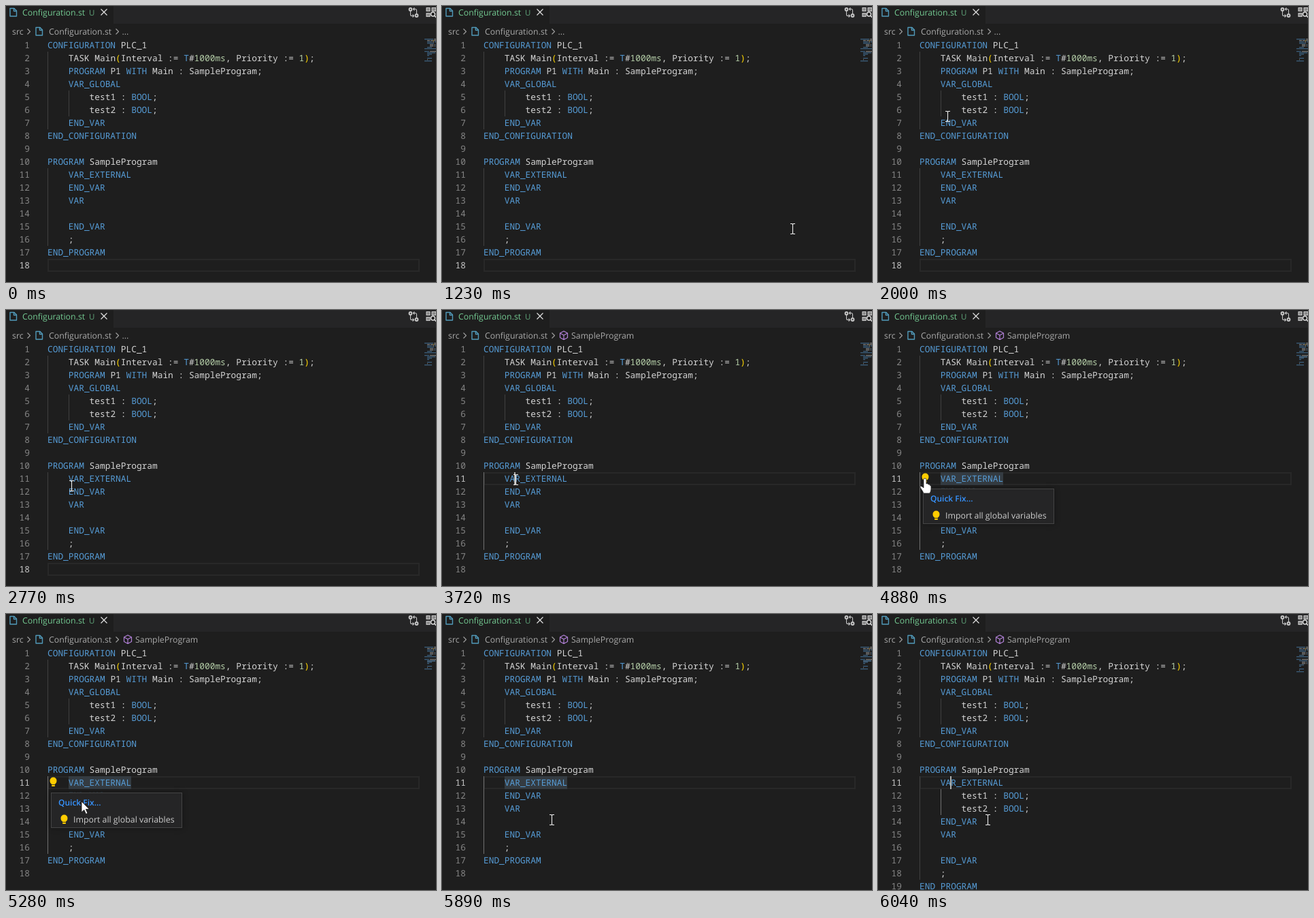
An HTML page with a canvas that plays this animation: 632 px wide and 405 px high, repeating every 6510 ms.

```html
<!DOCTYPE html>
<html lang="en">
<head>
<meta charset="utf-8">
<title>Quick fix in a code editor</title>
<style>
  html, body { margin: 0; width: 100%; height: 100%; overflow: hidden; background: #1e1e1e; }
  canvas { display: block; }
</style>
</head>
<body>
<canvas id="stage" width="632" height="405"></canvas>
<script>
const ctx = document.getElementById('stage').getContext('2d');
ctx.textRendering = 'geometricPrecision';

const LOOP = 6510;
const CLICK = 3540, HINT = 3790, POPUP = 4880, HOVER = 5350, CLOSE = 5890, INSERT = 5960;
const LEFT = 61, TOP = 48, ROW = 19, CHAR = 7.7;
const MONO = '12.83px "Noto Sans Mono", monospace';
const UI = '12.35px "Open Sans", sans-serif';
const BLUE = '#569cd6', GREEN = '#73c991', YELLOW = '#ffcc00', ICON = '#c5c5c5';

const VARIABLES = ['        test1 : BOOL;', '        test2 : BOOL;'];
const BEFORE = [
  'CONFIGURATION PLC_1',
  '    TASK Main(Interval := T#1000ms, Priority := 1);',
  '    PROGRAM P1 WITH Main : SampleProgram;',
  '    VAR_GLOBAL',
  ...VARIABLES,
  '    END_VAR',
  'END_CONFIGURATION',
  '',
  'PROGRAM SampleProgram',
  '    VAR_EXTERNAL',
  '    END_VAR',
  '    VAR',
  '',
  '    END_VAR',
  '    ;',
  'END_PROGRAM',
  ''
];
const AFTER = [...BEFORE.slice(0, 11), ...VARIABLES, ...BEFORE.slice(11)];

// Pointer path: time, x, y
const PATH = [
  [1230, 515, 327], [1460, 300, 190], [1620, 101, 150], [1690, 112, 93], [1850, 238, 122],
  [1920, 185, 156], [2000, 102, 162], [2080, 85, 135], [2150, 122, 101], [2230, 212, 104],
  [2310, 232, 135], [2380, 165, 166], [2460, 98, 190], [2540, 96, 213], [2770, 96, 258],
  [2920, 99, 247], [3010, 99, 247], [3480, 108, 249], [3960, 108, 249], [4270, 84, 249],
  [4345, 84, 249], [4570, 69, 248], [5200, 69, 248], [5280, 111, 275], [5430, 161, 304],
  [5810, 161, 304], [5890, 161, 302]
];

// The screen is refreshed about every 77 ms, so the pointer advances in steps.
function pointerAt(t) {
  const next = PATH.findIndex(key => key[0] > t);
  if (next < 0) return PATH[PATH.length - 1].slice(1);
  const [t0, x0, y0] = PATH[next - 1], [t1, x1, y1] = PATH[next];
  const k = Math.floor((t - t0) / 77 + .05) * 77 / (t1 - t0);
  return [x0 + (x1 - x0) * k, y0 + (y1 - y0) * k];
}

function rect(color, x, y, w, h) {
  ctx.fillStyle = color;
  ctx.fillRect(x, y, w, h);
}

function text(str, x, y, color, font = UI, align = 'left') {
  ctx.font = font;
  ctx.textAlign = align;
  ctx.fillStyle = color;
  ctx.fillText(str, x, y);
}

function shape(d, x, y, stroke, fill, width = 1) {
  const path = new Path2D(d);
  ctx.save();
  ctx.translate(x, y);
  ctx.lineWidth = width;
  ctx.lineJoin = 'round';
  if (fill) { ctx.fillStyle = fill; ctx.fill(path); }
  if (stroke) { ctx.strokeStyle = stroke; ctx.stroke(path); }
  ctx.restore();
}

const fileIcon = (x, y) =>
  shape('M1 1H7L10.5 4.5V12.5H1ZM6.5 1V5H10.5', x, y, '#519aba', null, 1.4);
const chevron = (x, y) => shape('M0 0L4 4L0 8', x, y, '#a0a0a0', null, 1.1);
const bulb = (x, y) => {
  shape('M-2.3 9V5.8C-4 4.6 -5 3 -5 .5A5 5 0 0 1 5 .5C5 3 4 4.6 2.3 5.8V9Z', x, y, null, YELLOW);
  rect('#1e1e1e', x - 2.3, y + 6, 4.6, .8);
};

function tokens(line) {
  const pattern = /(\b(?:CONFIGURATION|PROGRAM|WITH|BOOL|VAR(?:_\w+)?|END_\w+)\b|\bT(?=#))|([()])|(\b\d+(?:ms)?\b)|[^\s()]/g;
  return [...line.matchAll(pattern)].map(m => ({
    str: m[0],
    col: m.index,
    color: m[1] ? BLUE : m[2] ? '#ffd700' : m[3] ? '#b5cea8' : '#d4d4d4'
  }));
}

function drawHeader(clicked) {
  rect('#252526', 158, 0, 474, 26);
  fileIcon(5, 2.5);
  text('Configuration.st', 24, 14, GREEN);
  text('U', 122, 13.5, '#5ea277', '11.5px "Open Sans", sans-serif');
  shape('M0 0L9 9M9 0L0 9', 139.5, 4.5, '#e0e0e0', null, 1.2);

  shape('M3 5V11Q3 13 5 13H8M6 11L8 13L6 15M12 11V5Q12 3 10 3H7M9 1L7 3L9 5', 591.5, 1.5, ICON, null, 1.1);
  for (const [x, y] of [[594.5, 5], [603.5, 14]]) {
    ctx.beginPath();
    ctx.arc(x, y, 1.9, 0, 7);
    ctx.strokeStyle = ICON;
    ctx.stroke();
  }
  shape('M0 0H5V5H0ZM0 8H5V13H0ZM8 0H14V5H8Z', 618, 2.5, ICON, '#8a8a8a', 1.2);
  shape('M7 9A3 3 0 1 1 13 9A3 3 0 1 1 7 9M12 11L15 14', 617.5, 3, '#e0e0e0', '#1e1e1e', 1.4);

  text('src', 9, 42, '#a9a9a9');
  chevron(31.5, 33.5);
  fileIcon(43, 30.5);
  text('Configuration.st', 63, 42, '#a9a9a9');
  chevron(161.5, 33.5);
  if (clicked) {
    shape('M6 0L11.5 3V9.5L6 12.5L.5 9.5V3ZM.5 3L6 6L11.5 3M6 6V12.5', 173, 31, '#b180d7', null, 1.2);
    text('SampleProgram', 190, 42, '#a9a9a9');
  } else {
    text('...', 170.5, 42, '#a9a9a9');
  }
}

function guide(col, first, last, active) {
  rect(active ? '#707070' : '#404040', Math.round(LEFT + col * CHAR), TOP + (first - 1) * ROW, 1, (last - first + 1) * ROW);
}

function drawEditor(t) {
  const clicked = t >= CLICK, inserted = t >= INSERT;
  const lines = inserted ? AFTER : BEFORE;
  const activeLine = clicked ? 11 : 18;
  const highlighted = t >= HINT && !inserted;

  ctx.strokeStyle = '#282828';
  ctx.lineWidth = 2;
  ctx.strokeRect(LEFT + 1, TOP + (activeLine - 1) * ROW + 1, 545, ROW - 2);

  if (highlighted) {
    rect('#343b41', 92, 238, 92, ROW);
    rect('#3a4249', 619, 68, 12, 2);
  }

  guide(0, 2, 7);
  guide(4, 5, 6);
  guide(0, 11, inserted ? 18 : 16, clicked && !inserted);
  if (inserted) guide(4, 12, 13, true);

  lines.forEach((line, i) => {
    const baseline = TOP + i * ROW + 14;
    text(i + 1, 35, baseline, i + 1 === activeLine ? '#c6c6c6' : '#858585', MONO, 'right');
    for (const { str, col, color } of tokens(line)) {
      text(str, LEFT + col * CHAR, baseline, color, MONO);
      ctx.globalAlpha = .5;
      rect(color, 615 + col, TOP + i * 2, str.length, 1);
      ctx.globalAlpha = .15;
      rect(color, 615 + col, TOP + i * 2 + 1, str.length, 1);
      ctx.globalAlpha = 1;
    }
  });

  const blinkOn = Math.floor((t - CLICK) / 500) % 2 === 0;
  if (inserted || (clicked && t < POPUP && blinkOn)) rect('#aeafad', 106, 238, 2, ROW);
  if (t >= HINT && t < CLOSE) bulb(69.5, 244);
}

function drawPopup(t) {
  ctx.save();
  ctx.shadowColor = 'rgba(0,0,0,.36)';
  ctx.shadowBlur = 8;
  rect('#454545', 66, 262, 193, 52);
  ctx.restore();
  rect('#252526', 67, 263, 191, 50);
  if (t >= HOVER) rect('#04395e', 67, 289, 191, 24);
  text('Quick Fix...', 77, 281, '#3794ff', '600 12px "Open Sans", sans-serif');
  bulb(85.5, 299);
  text('Import all global variables', 99, 306, '#cccccc');
}

function drawPointer(t) {
  const [x, y] = pointerAt(t);
  if (t >= 4500 && t < 5280) {
    shape('M-2 1Q-2 -1 0 -1T2 1V7Q4 5.5 5 8Q7 7 7.5 9.5Q9 9 9 11V15Q9 18 7 21H-2Q-3 18 -6 14Q-8 11 -6 10.5Q-4 10.5 -2 13Z', x, y, '#222', '#fff', .8);
  } else if (t >= 5280 && t < CLOSE) {
    shape('M0 0V16L3.8 12.5L6.5 18.5L9 17.4L6.4 11.6H11.5Z', x, y, '#111', '#fff', .8);
  } else {
    const beam = 'M-3.5 -7.5H-1.2L0 -6.7L1.2 -7.5H3.5M0 -7V7M-3.5 7.5H-1.2L0 6.7L1.2 7.5H3.5';
    shape(beam, Math.floor(x) + .5, Math.round(y), '#eeeeee', null, 1.1);
  }
}

function draw(t) {
  rect('#1e1e1e', 0, 0, 632, 405);
  drawHeader(t >= CLICK);
  drawEditor(t);
  if (t >= POPUP && t < CLOSE) drawPopup(t);
  if (t >= PATH[0][0]) drawPointer(t);
}

const start = performance.now();
function frame() {
  draw((performance.now() - start) % LOOP);
  requestAnimationFrame(frame);
}
frame();
</script>
</body>
</html>
```
